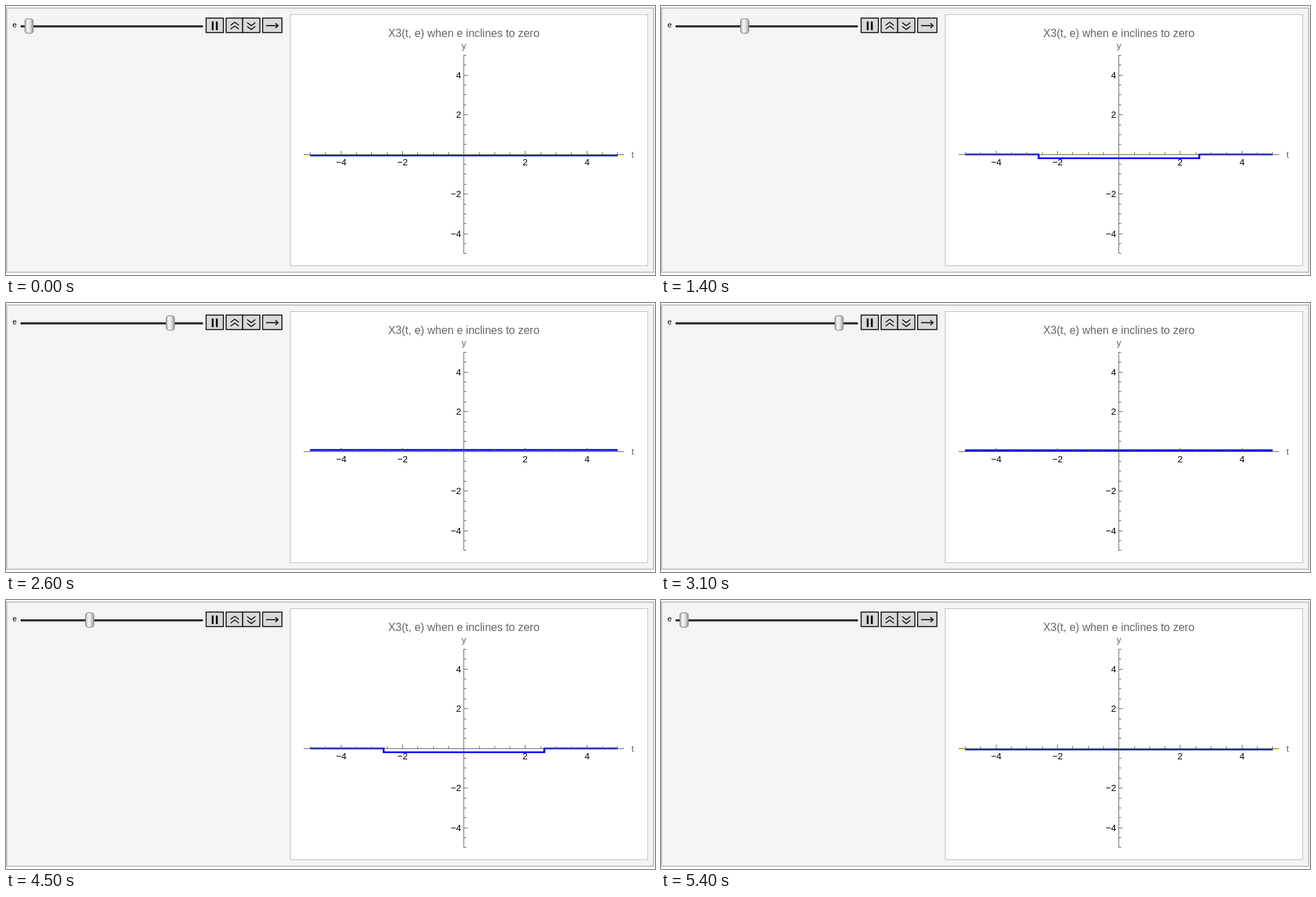
Recreate the animation shown at these times as an HTML page. Size 942 by 390 pixels, loop 6000 ms.

```html
<!DOCTYPE html>
<html lang="en">
<head>
<meta charset="utf-8">
<title>X3(t, e)</title>
<style>
  html, body { margin: 0; width: 100%; height: 100%; overflow: hidden; background: #fff; }
  svg { display: block; font-family: "Liberation Sans", Arial, sans-serif; font-size: 13.33px; }
  .mid { text-anchor: middle; }
  .end { text-anchor: end; }
  .soft { fill: #666; }
  .btn rect { fill: #d9d9d9; stroke: #000; stroke-width: 1.4; }
  .btn path { fill: none; stroke: #000; stroke-width: 1.4; }
  #axes { fill: none; stroke: #5c5c5c; stroke-opacity: .9; }
  #curve { fill: none; stroke: #00f; stroke-width: 2.7; }
</style>
</head>
<body>
<svg width="942" height="390" viewBox="0 0 942 390">
  <defs>
    <linearGradient id="metal">
      <stop offset="0" stop-color="#a4a4a4"/>
      <stop offset=".3" stop-color="#f6f6f6"/>
      <stop offset=".6" stop-color="#e4e4e4"/>
      <stop offset="1" stop-color="#969696"/>
    </linearGradient>
  </defs>
  <rect x="1" y="3" width="939" height="383" fill="#f4f4f4" stroke="#c6c6c6" stroke-width="2"/>
  <rect x="412.5" y="12.5" width="519" height="364" fill="#fff" stroke="#c2c2c2"/>

  <text x="9.5" y="31" font-size="11">e</text>
  <rect x="21" y="28" width="265" height="3" rx="1.5" fill="#111"/>
  <path d="M23 29.5H284" stroke="#555"/>
  <g class="btn">
    <rect x="290.5" y="17.5" width="25" height="21"/>
    <rect x="319.5" y="17.5" width="24" height="21"/>
    <rect x="343.5" y="17.5" width="25" height="21"/>
    <rect x="372.5" y="17.5" width="28" height="21"/>
    <path d="M300 22.5V35M306 22.5V35" style="stroke-width:2.6"/>
    <path d="M326 28l6-4.5 6 4.5M326 33.5l6-4.5 6 4.5"/>
    <path d="M350 24l6 4.5 6-4.5M350 29.5l6 4.5 6-4.5"/>
    <path d="M377.5 28.5H395M391 25l4 3.5-4 3.5"/>
  </g>
  <rect id="thumb" y="18.5" width="12" height="21" rx="3.5" fill="url(#metal)" stroke="#858585"/>

  <text class="mid soft" x="664.5" y="45" font-size="16">X3(t, e) when e inclines to zero</text>
  <text class="mid soft" x="664.5" y="62">y</text>
  <text class="mid soft" x="909.5" y="220">t</text>
  <path id="curve"/>
  <path id="axes"/>
  <g id="labels"></g>
</svg>
<script>
  const get = id => document.getElementById(id);
  const thumb = get('thumb'), curve = get('curve');
  const X = t => 664.7 + 44.63 * t;
  const Y = v => 215.23 - 28.75 * v;
  const snap = p => Math.floor(p) + .5;

  function label(text, x, y, cls) {
    const el = document.createElementNS('http://www.w3.org/2000/svg', 'text');
    el.setAttribute('x', x);
    el.setAttribute('y', y);
    el.setAttribute('class', cls);
    el.textContent = String(text).replace('-', '\u2212');
    get('labels').append(el);
  }

  function drawAxes() {
    let d = 'M432 215.5H897M664.5 71V359';
    for (let v = -5; v <= 5; v += .5) {
      const major = v % 2 === 0;
      if (v) {
        d += `M${snap(X(v))} 215v${major ? -5 : -3}`;
        d += `M665 ${snap(Y(v))}h${major ? 5 : 3}`;
      }
      if (v && major) {
        label(v, snap(X(v)), 231, 'mid');
        label(v, 660.6, snap(Y(v)) + 4.5, 'end');
      }
    }
    get('axes').setAttribute('d', d);
  }

  // Pulse of height 1/(2e) on |t| < |e|
  function pulse(e) {
    const w = Math.min(Math.abs(e), 5), top = Y(1 / (2 * e)), base = Y(0);
    if (w === 5) return `M${X(-5)} ${top}H${X(5)}`;
    return `M${X(-5)} ${base}H${X(-w)}V${top}H${X(w)}V${base}H${X(5)}`;
  }

  // 24 steps up, then 24 back, one every 100 ms
  function stepAt(ms) {
    const t = ms % 6000;
    const k = t < 3000 ? Math.floor((t - 500) / 100) : 24 - Math.floor((t - 3000) / 100);
    return Math.max(0, Math.min(24, k));
  }

  let last = -1;
  function frame() {
    const k = stepAt(performance.now());
    if (k !== last) {
      last = k;
      thumb.setAttribute('x', Math.round(27.06 + 9.78 * k) + .5);
      curve.setAttribute('d', pulse(.8146 * (k - 12.207)));
    }
    requestAnimationFrame(frame);
  }

  drawAxes();
  frame();
</script>
</body>
</html>
```
